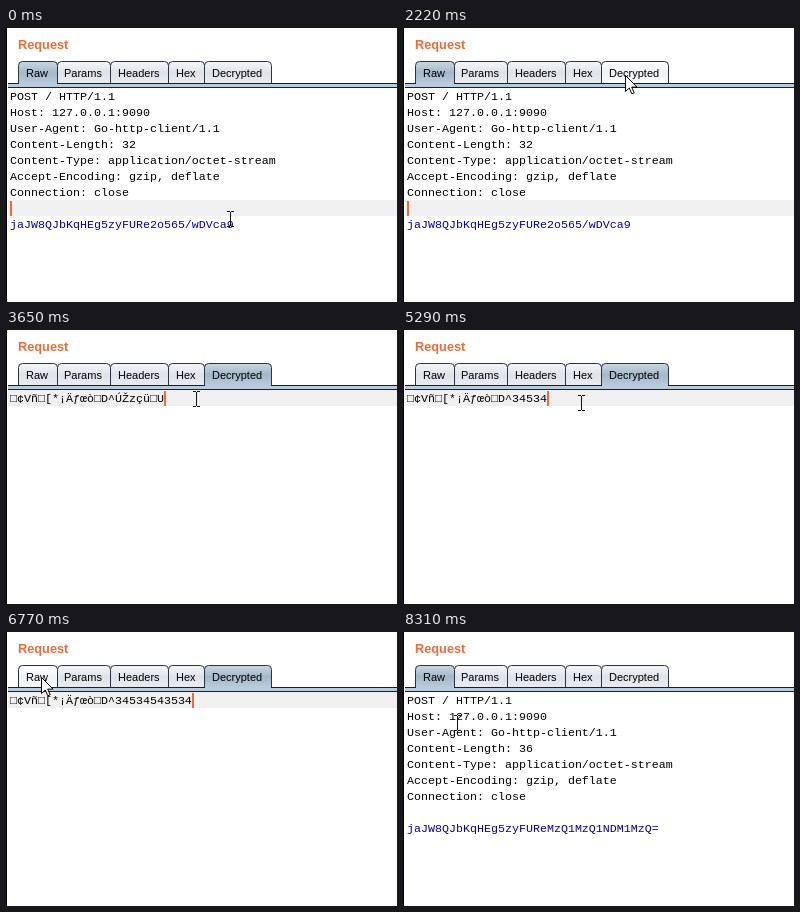
An HTML page for the animation above (9.09 s loop, 391x274 px).

```html
<!DOCTYPE html>
<html lang="en">
<head>
<meta charset="utf-8">
<title>Request editor</title>
<style>
  html, body { margin: 0; width: 100%; height: 100%; overflow: hidden; background: #fff; }
  svg { display: block; width: 391px; height: 274px; }
  text { white-space: pre; }
  .title { font: bold 12.75px "Liberation Sans", Arial, sans-serif; fill: #f26a38; }
  .tab path { fill: url(#plain); stroke: #2a333e; }
  .tab text { font: 11px "Liberation Sans", Arial, sans-serif; fill: #000; }
  .tab.hover path { fill: url(#hover); }
  .tab.on path { fill: url(#on); }
  .tab.on.hover path { fill: url(#onHover); }
  .code { font: 11.667px "Liberation Mono", "Courier New", monospace; fill: #000; }
  .body { fill: #0000b0; }
</style>
</head>
<body>
<svg viewBox="0 0 391 274">
  <defs>
    <linearGradient id="plain" x2="0" y2="1">
      <stop stop-color="#f5f6f8"/><stop offset=".5" stop-color="#dfe3e8"/>
      <stop offset="1" stop-color="#e9edf1"/>
    </linearGradient>
    <linearGradient id="hover" x2="0" y2="1">
      <stop stop-color="#fff"/><stop offset=".5" stop-color="#eff1f4"/>
      <stop offset="1" stop-color="#fafbfc"/>
    </linearGradient>
    <linearGradient id="on" x2="0" y2="1">
      <stop stop-color="#cbd7e2"/><stop offset=".5" stop-color="#a4b8ca"/>
      <stop offset="1" stop-color="#b9ccde"/>
    </linearGradient>
    <linearGradient id="onHover" x2="0" y2="1">
      <stop stop-color="#dce5ed"/><stop offset=".5" stop-color="#b6c7d7"/>
      <stop offset="1" stop-color="#c4d5e5"/>
    </linearGradient>
  </defs>
  <rect width="391" height="274" fill="#fff"/>
  <rect width="1" height="274" fill="#000"/>
  <text class="title" x="12" y="21">Request</text>

  <g id="tabs"></g>
  <rect x="2" y="55" width="389" height="5" fill="#b9ccde"/>
  <path id="edge" stroke="#18202a" fill="none"/>
  <path d="M2 59.5H391" stroke="#18202a"/>

  <rect id="row" x="2" width="389" height="16" fill="#f0f0f0"/>
  <g id="raw" class="code"></g>
  <text id="plainText" class="code" x="4" y="72"></text>
  <rect id="caret" width="2" height="15" fill="#f26a38"/>

  <path id="arrow" d="M.5 .5V16.5L4.3 13 6.8 18.8 9.2 17.8 6.7 12.1H12Z" fill="#fff" stroke="#000"/>
  <path id="beam" d="M-3 -7.5H0M1 -7.5H4M.5 -7V7M-3 7.5H0M1 7.5H4" fill="none" stroke="#111"/>
</svg>
<script>
const LOOP = 9090, CHAR = 7, LINE = 16, LEFT = 4, TOP = 60, BASE = 72;
const TO_DECRYPTED = 2370, TO_RAW = 6910;
const $ = id => document.getElementById(id);

function add(parent, tag, attrs, text = '') {
  const el = document.createElementNS('http://www.w3.org/2000/svg', tag);
  for (const k in attrs) el.setAttribute(k, attrs[k]);
  el.textContent = text;
  return parent.appendChild(el);
}

// label, left, right, text x
const tabs = [
  ['Raw', 12, 51, 20], ['Params', 51, 104, 58], ['Headers', 104, 162, 112],
  ['Hex', 162, 198, 170], ['Decrypted', 198, 265, 206]
].map(([label, x1, x2, tx]) => {
  const el = add($('tabs'), 'g', { class: 'tab' });
  const a = x1 + .5, b = x2 + .5;
  add(el, 'path', { d: `M${a} 56V37.5A4 4 0 0 1 ${a + 4} 33.5H${b - 4}A4 4 0 0 1 ${b} 37.5V56` });
  add(el, 'text', { x: tx, y: 49 }, label);
  return { el, x1, x2 };
});

const head = ['POST / HTTP/1.1', 'Host: 127.0.0.1:9090', 'User-Agent: Go-http-client/1.1',
  'Content-Length: 32', 'Content-Type: application/octet-stream',
  'Accept-Encoding: gzip, deflate', 'Connection: close', '',
  'jaJW8QJbKqHEg5zyFURe2o565/wDVca9'];
const lines = head.map((s, i) =>
  add($('raw'), 'text', { x: LEFT, y: BASE + i * LINE, class: i === 8 ? 'body' : '' }, s));

const KEEP = '□¢Vñ□[*¡Äƒœò□D^', OLD = 'ÚŽzçü□UÆ½', NEW = '34534543534';
const erased = [3410, 3650, 3800, 3980, 4130, 4230, 4400, 4560, 4640];
const typed = [5050, 5130, 5210, 5290, 5290, 5440, 5520, 5610, 5610, 5770, 5850];
const blinks = [0, 90, 560, 950, 1320, 1740, 2220, TO_DECRYPTED, 3320, 6310, 6710, TO_RAW];

// first step, last step, number of steps, x, y
const moves = [
  [870, 1040, 3, 224, 180],
  [1660, 2070, 6, 222, 47],
  [2620, 2990, 5, 181, 69],
  [3320, 3320, 1, 190, 69],
  [5210, 5290, 2, 178, 73],
  [5930, 6630, 10, 45, 64],
  [6710, 6770, 2, 35, 45],
  [7060, 7210, 3, 38, 73],
  [7290, 7630, 5, 54, 90],
  [8310, 8310, 1, 54, 91]
];

const passed = (times, t) => times.filter(v => t >= v).length;
const show = (el, on) => el.setAttribute('visibility', on ? 'visible' : 'hidden');

function pointer(t) {
  let x = 224, y = 191;
  for (const [start, end, n, tx, ty] of moves) {
    if (t < start) break;
    const step = n === 1 ? 1 : Math.min(n, 1 + Math.floor((t - start) / (end - start) * (n - 1) + 1e-6));
    const u = step / n, k = n > 3 ? u * u * (3 - 2 * u) : u;
    x += (tx - x) * k;
    y += (ty - y) * k;
  }
  return [Math.round(x), Math.round(y)];
}

function draw(t) {
  const decrypted = t >= TO_DECRYPTED && t < TO_RAW;
  const edited = t >= TO_RAW;
  const [px, py] = pointer(t);

  const active = tabs[decrypted ? 4 : 0];
  for (const tab of tabs) {
    tab.el.classList.toggle('on', tab === active);
    tab.el.classList.toggle('hover', py > 33 && py < 55 && px >= tab.x1 && px < tab.x2);
  }
  $('edge').setAttribute('d', `M2 55.5H${active.x1 + 1}M${active.x2} 55.5H391`);

  lines[3].textContent = 'Content-Length: ' + (edited ? 36 : 32);
  lines[8].textContent = edited ? 'jaJW8QJbKqHEg5zyFUReMzQ1MzQ1NDM1MzQ=' : head[8];
  const text = KEEP + OLD.slice(0, OLD.length - passed(erased, t)) + NEW.slice(0, passed(typed, t));
  $('plainText').textContent = text;
  show($('raw'), !decrypted);
  show($('plainText'), decrypted);

  $('row').setAttribute('y', t < TO_DECRYPTED ? TOP + 7 * LINE : TOP);
  show($('row'), t < TO_DECRYPTED || (t >= 2620 && t < 7060));
  $('caret').setAttribute('x', decrypted ? LEFT + CHAR * text.length : LEFT);
  $('caret').setAttribute('y', 1 + (decrypted ? TOP : TOP + 7 * LINE));
  show($('caret'), passed(blinks, t) % 2 === 1);

  const arrow = py < 56;
  show($('arrow'), arrow);
  show($('beam'), !arrow);
  $(arrow ? 'arrow' : 'beam').setAttribute('transform', `translate(${px} ${py})`);
}

const t0 = performance.now();
function tick(now) {
  draw(Math.max(0, now - t0) % LOOP);
  requestAnimationFrame(tick);
}
draw(0);
requestAnimationFrame(tick);
</script>
</body>
</html>
```
